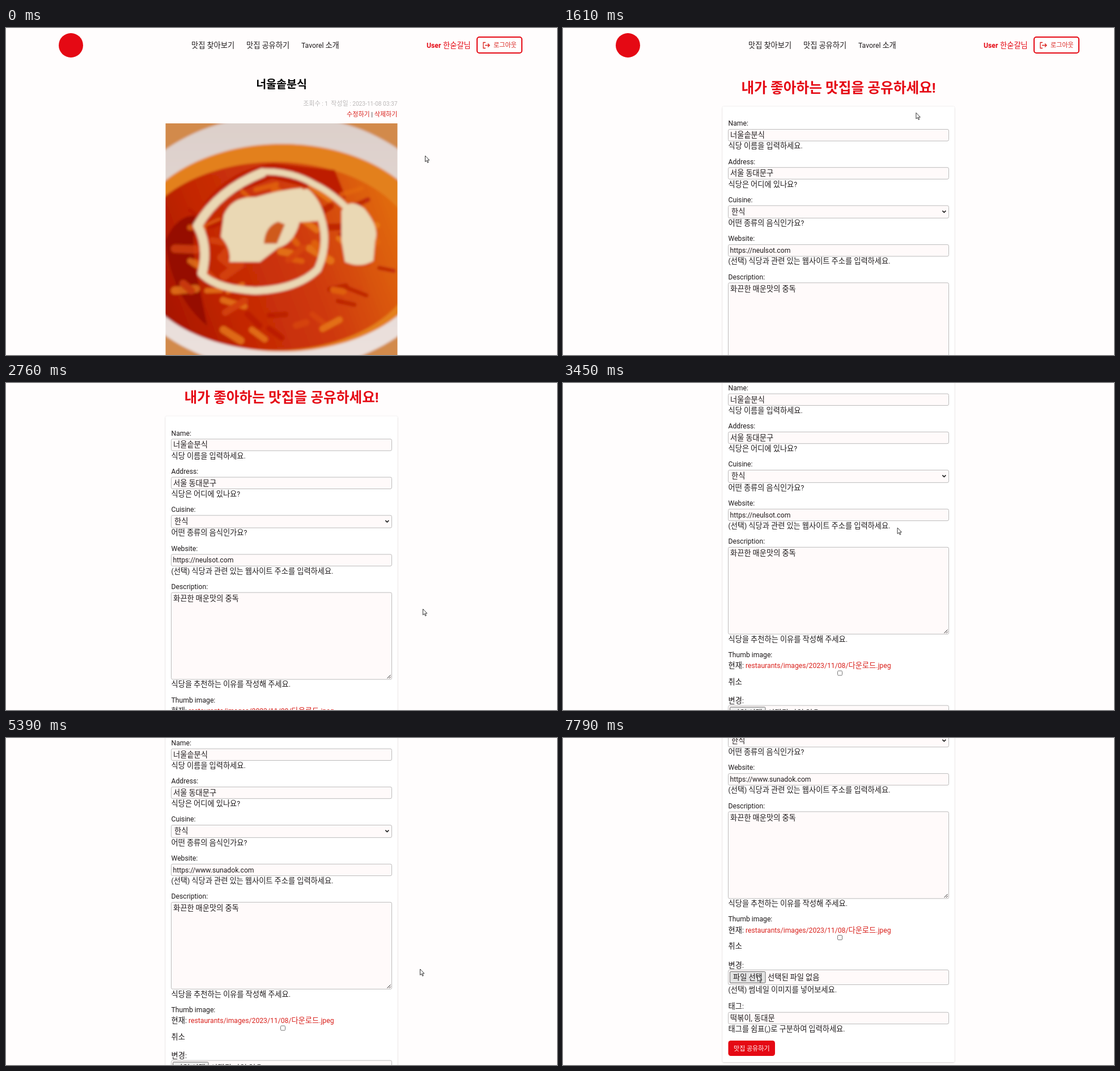
Animation of 972x576 px, one loop 7.99 s. Source, as an HTML page:

```html
<!DOCTYPE html>
<html lang="ko">
<head>
<meta charset="utf-8">
<title>맛집 공유</title>
<style>
  html, body { margin: 0; width: 100%; height: 100%; overflow: hidden; background: #fffdfd; }
  svg { display: block; }
  text { font: 12.2px Roboto, "Noto Sans CJK KR", "Noto Sans CJK", sans-serif; fill: #1f1b1c; white-space: pre; }
  .ko { font-size: 1.087em; font-weight: 350; }
  .small { font-size: 10.2px; }
  .bold { font-weight: 700; }
  .title { font-size: 19.5px; fill: #000; }
  .heading { font-size: 24.7px; }
  .red { fill: #e50914; }
  .link { fill: #d9211c; }
  .faint { fill: #bbb8b8; }
  .white { fill: #fff; }
  .tip { font-size: 9.8px; fill: #e8eaed; }
  .end { text-anchor: end; }
  .mid { text-anchor: middle; }
  .field { fill: #fffafa; stroke: #bcbcbc; }
  .focus { stroke: #101010; stroke-width: 2; }
  .line { fill: none; stroke: #222; }
  .cheese { fill: #ead8b4; }
  .swirl { fill: none; stroke: #ead8b4; stroke-linecap: round; stroke-linejoin: round; }
  #flecks { stroke-linecap: round; opacity: .75; }
  #cursor { stroke: #222; stroke-width: .9; fill: #fff; stroke-linejoin: round; }
</style>
</head>
<body>
<svg width="972" height="576" viewBox="0 0 972 576">
  <defs>
    <linearGradient id="soup" x1="0" y1=".6" x2="1" y2=".35">
      <stop offset="0" stop-color="#a01004"/>
      <stop offset=".3" stop-color="#c42706"/>
      <stop offset=".6" stop-color="#cf3a08"/>
      <stop offset="1" stop-color="#e4720f"/>
    </linearGradient>
    <linearGradient id="rim" x2="0" y2="1">
      <stop offset="0" stop-color="#dccfca"/>
      <stop offset="1" stop-color="#ece2de"/>
    </linearGradient>
    <clipPath id="frame"><path d="M281.500 168h409v408h-409z"/></clipPath>
    <filter id="soft" x="-10%" y="-10%" width="120%" height="120%"><feGaussianBlur stdDeviation="2"/></filter>
    <filter id="shade" x="-5%" y="-5%" width="110%" height="110%">
      <feDropShadow dx="0" dy="0.500" stdDeviation="1.2" flood-opacity=".25"/>
    </filter>
  </defs>

  <g id="page">
    <g id="header">
      <circle cx="114.500" cy="30.500" r="21.500" fill="#e50914"/>
      <rect x="831" y="16" width="79" height="28" rx="4" fill="#fff" stroke="#e50914" stroke-width="2"/>
      <path d="M846 25.500h-4v10h4M845 30.500h8m-3-3 3 3-3 3" fill="none" stroke="#d9211c" stroke-width="1.300"/>
    </g>

    <g id="detail">
      <path id="underline" d="M601 157.500h41" stroke="#d9211c"/>
      <g clip-path="url(#frame)"><g filter="url(#soft)">
        <path d="M270 150h440v440H270z" fill="#d28a4c"/>
        <ellipse cx="487" cy="378" rx="300" ry="225" fill="url(#rim)"/>
        <ellipse cx="487" cy="387" rx="270" ry="183" fill="#e3801f"/>
        <ellipse cx="475" cy="402" rx="252" ry="166" fill="url(#soup)"/>
        <path d="M281 375Q290 470 355 525L340 450Q325 400 335 330Q300 330 281 375z" fill="#960f04"/>
        <path d="M345 315Q390 250 470 238L580 250L600 300L470 265z" fill="#bd1a06"/>
        <g id="flecks"></g>
        <g class="swirl">
          <path d="M452 255Q375 285 338 348Q358 385 346 432" stroke-width="16"/>
          <path d="M348 436Q375 460 440 463Q515 460 550 425Q570 380 556 335Q548 305 530 290" stroke-width="13"/>
          <path d="M455 253Q505 252 545 276Q575 290 604 320" stroke-width="11"/>
        </g>
        <path class="cheese" d="M384 330Q398 296 440 298Q485 285 520 282Q552 295 550 340L518 342Q508 380 480 387L448 412H394Q398 388 379 368z"/>
        <path d="M455 380Q456 350 480 341L492 346L478 380z" fill="#cf5a1c"/>
        <path class="cheese" d="M592 322Q605 298 632 318Q660 352 651 375L648 410Q625 424 598 412L592 375z"/>
      </g></g>
    </g>

    <g id="form">
      <rect x="281.500" y="138.500" width="409" height="751.500" rx="2" fill="#fff" filter="url(#shade)"/>
    </g>
  </g>

  <g id="status"><rect x="-10" y="567.500" width="50" height="20" rx="3" fill="#202124"/></g>

  <g id="cursor">
    <path id="arrow" d="M0 0V10.600L2.500 8.400L4.200 12.300L5.800 11.600L4.100 7.800H7.400Z"/>
    <path id="hand" d="M-1.200.8Q0-.8 1.200.8V5.200L2.600 4.900L4.300 5.500L6 6L7.500 7V10.500L6.200 14H.2L-3 9.400Q-3.200 7.600-1.900 7.900L-1.200 8.600Z"/>
    <path id="beam" d="M-3-7H-.7L0-6.300.7-7H3M0-6.300V6.300M-3 7H-.7L0 6.300.7 7H3" fill="none"/>
  </g>
</svg>

<script>
  const LOOP = 7990, NOTCH = 79.75, LEFT = 291.5;
  const OLD_URL = 'https://neulsot.com', NEW_URL = 'https://www.sunadok.com';
  const SHOP = '너울솥분식';
  const $ = id => document.getElementById(id);
  const add = (id, ...parts) => $(id).insertAdjacentHTML('beforeend', parts.join(''));
  const show = (id, on) => $(id).style.display = on ? '' : 'none';

  // Regular-weight Hangul is one em wide per syllable.
  function text(x, y, s, cls = '', id = '') {
    const body = cls.includes('bold') ? s : s.replace(/[가-힣]+/g, '<tspan class="ko">$&</tspan>');
    return `<text x="${x}" y="${y}" class="${cls}" id="${id}">${body}</text>`;
  }
  const box = (y, h, id = '') =>
    `<rect id="${id}" class="field" x="${LEFT}" y="${y}" width="389" height="${h}" rx="2.5"/>`;

  // Adds label, box, value and help; returns the baseline of the next label.
  function field(y, label, value, help, { h = 20.5, x = 295, id = '' } = {}) {
    const bottom = y + 6.2 + h;
    add('form', text(LEFT, y, label), box(y + 6.2, h, id), text(x, y + 20.9, value),
      text(LEFT, bottom + 13.3, help));
    return bottom + 40.5;
  }

  function buildHeader() {
    add('header',
      text(327, 35, '맛집 찾아보기'), text(424, 35, '맛집 공유하기'), text(521, 35, 'Tavorel 소개'),
      text(742, 35, 'User', 'red bold'), text(771, 35, '한숟갈님', 'red'),
      text(860, 34.2, '로그아웃', 'small link'));
  }

  function buildDetail() {
    add('detail',
      text(486, 106.2, SHOP, 'title bold mid'),
      text(690.5, 136.8, '조회수 : 1&#160; 작성일 : 2023-11-08 03:37', 'small faint end'),
      text(601, 155.5, '수정하기', 'small link'), text(644.5, 155.5, '|', 'small'),
      text(690.5, 155.5, '삭제하기', 'small link end'));

    // Rice cakes scattered through the soup
    let seed = 11;
    const rnd = () => (seed = seed * 16807 % 2147483647) / 2147483647;
    const colors = ['#e4690f', '#ea8118', '#d8480b', '#b81b05'];
    for (let i = 0; i < 56; i++) {
      const a = rnd() * 2 * Math.PI, r = Math.sqrt(rnd());
      const x = 478 + 205 * r * Math.cos(a), y = 408 + 140 * r * Math.sin(a);
      const dx = 14 + 24 * rnd(), dy = 44 * (rnd() - .5);
      add('flecks', `<path d="M${x} ${y}l${dx} ${dy}" stroke="${colors[i % 4]}" stroke-width="${7 + 8 * rnd()}"/>`);
    }
  }

  function buildForm() {
    add('form', text(486, 114, '내가 좋아하는 맛집을 공유하세요!', 'heading red bold mid'));
    let y = field(172.3, 'Name:', SHOP, '식당 이름을 입력하세요.');
    y = field(y, 'Address:', '서울 동대문구', '식당은 어디에 있나요?');
    add('header', '');
    y = field(y, 'Cuisine:', '한식', '어떤 종류의 음식인가요?', { h: 22, x: 297 });
    const urlY = y;
    y = field(y, 'Website:', '', '(선택) 식당과 관련 있는 웹사이트 주소를 입력하세요.', { id: 'urlBox' });
    y = field(y, 'Description:', '화끈한 매운맛의 중독', '식당을 추천하는 이유를 작성해 주세요.', { h: 153 });
    add('form',
      `<path class="line" d="M669.3 321.8l3 3 3-3" stroke-width="1.7"/>`,
      `<rect id="mark" x="294" y="${urlY + 9.5}" width="110" height="14.5" fill="#3367d1"/>`,
      text(294.5, urlY + 20.6, '', '', 'url'),
      `<path class="line" d="M672.5 600l6-6M676 600l2.700-2.700"/>`,
      text(LEFT, y, 'Thumb image:'), text(LEFT, y + 19.4, '현재:'),
      text(322, y + 19.4, 'restaurants/images/2023/11/08/다운로드.jpeg', 'link'),
      `<rect x="484.5" y="666.5" width="8" height="8" rx="1.5" fill="#fff" stroke="#767676"/>`,
      text(LEFT, 690, '취소'), text(LEFT, 723.7, '변경:'), box(727.5, 26),
      `<rect id="pick" x="294.5" y="730.5" width="62.5" height="20" rx="1.5" stroke="#6b6b6b"/>`,
      text(300, 745.2, '파일 선택'), text(361, 745.2, '선택된 파일 없음'),
      text(LEFT, 767.3, '(선택) 썸네일 이미지를 넣어보세요.'));
    field(796, '태그:', '떡볶이, 동대문', '태그를 쉼표(,)로 구분하여 입력하세요.');
    add('form',
      `<rect x="${LEFT}" y="852" width="82.5" height="27" rx="4.5" fill="#e50914"/>`,
      text(301, 869.8, '맛집 공유하기', 'small white'));
  }

  // Pointer moves: start, end, x, y
  const moves = [
    [0, 0, 739.5, 225],
    [130, 670, 622.5, 148.5],
    [1590, 2220, 735.5, 398],
    [2850, 3230, 680, 384],
    [3300, 3450, 590, 255],
    [3640, 4060, 583, 234],
    [4520, 4960, 804, 340],
    [4960, 5390, 730.5, 407],
    [5800, 5910, 672.5, 429],
    [6820, 7590, 343.5, 418]
  ];
  // Wheel notches: start, duration
  const notches = [[2472, 280], [2800, 280], [5430, 170], [6395, 230]];

  function ease(t, from, to) {
    const p = Math.min(1, Math.max(0, (t - from) / (to - from || 1)));
    return p * p * (3 - 2 * p);
  }

  function pointerAt(t) {
    let [, , x, y] = moves[0];
    for (const [from, to, nx, ny] of moves) {
      const p = ease(t, from, to);
      x += (nx - x) * p;
      y += (ny - y) * p;
    }
    return [x, y];
  }

  const scrollAt = t => notches.reduce((sum, [at, dur]) => sum + NOTCH * ease(t, at, at + dur), 0);
  const inside = (x, y, l, top, r, bottom) => x >= l && x <= r && y >= top && y <= bottom;

  function draw(t) {
    const [x, y] = pointerAt(t), top = scrollAt(t);
    const onForm = t >= 1340;
    const onLink = !onForm && inside(x, y, 600, 146, 642, 159);
    const onUrl = t > 3230 && inside(x, y + top, 292, 381, 680, 402);
    const onPick = onForm && inside(x, y + top, 295, 730, 357, 751);
    const selected = t >= 4260 && t < 4400;

    $('page').setAttribute('transform', `translate(0 ${-top})`);
    show('detail', !onForm);
    show('form', onForm);
    show('underline', onLink);
    show('status', t >= 810 && t < 1610);
    $('status').style.opacity = t < 870 ? .5 : 1;

    $('urlBox').classList.toggle('focus', t >= 4190 && t < 5000);
    $('url').textContent = t < 4400 ? OLD_URL : NEW_URL;
    $('url').style.fill = selected ? '#fff' : '';
    show('mark', selected);
    $('pick').style.fill = onPick ? '#e3e3e3' : '#efefef';

    $('cursor').setAttribute('transform', `translate(${x} ${y})`);
    show('hand', onLink);
    show('beam', onUrl);
    show('arrow', !onLink && !onUrl);
  }

  buildHeader();
  buildDetail();
  buildForm();
  add('status', text(-1, 579, '12/edit/', 'tip'));

  const start = performance.now();
  function tick() {
    draw((performance.now() - start) % LOOP);
    requestAnimationFrame(tick);
  }
  tick();
</script>
</body>
</html>
```
